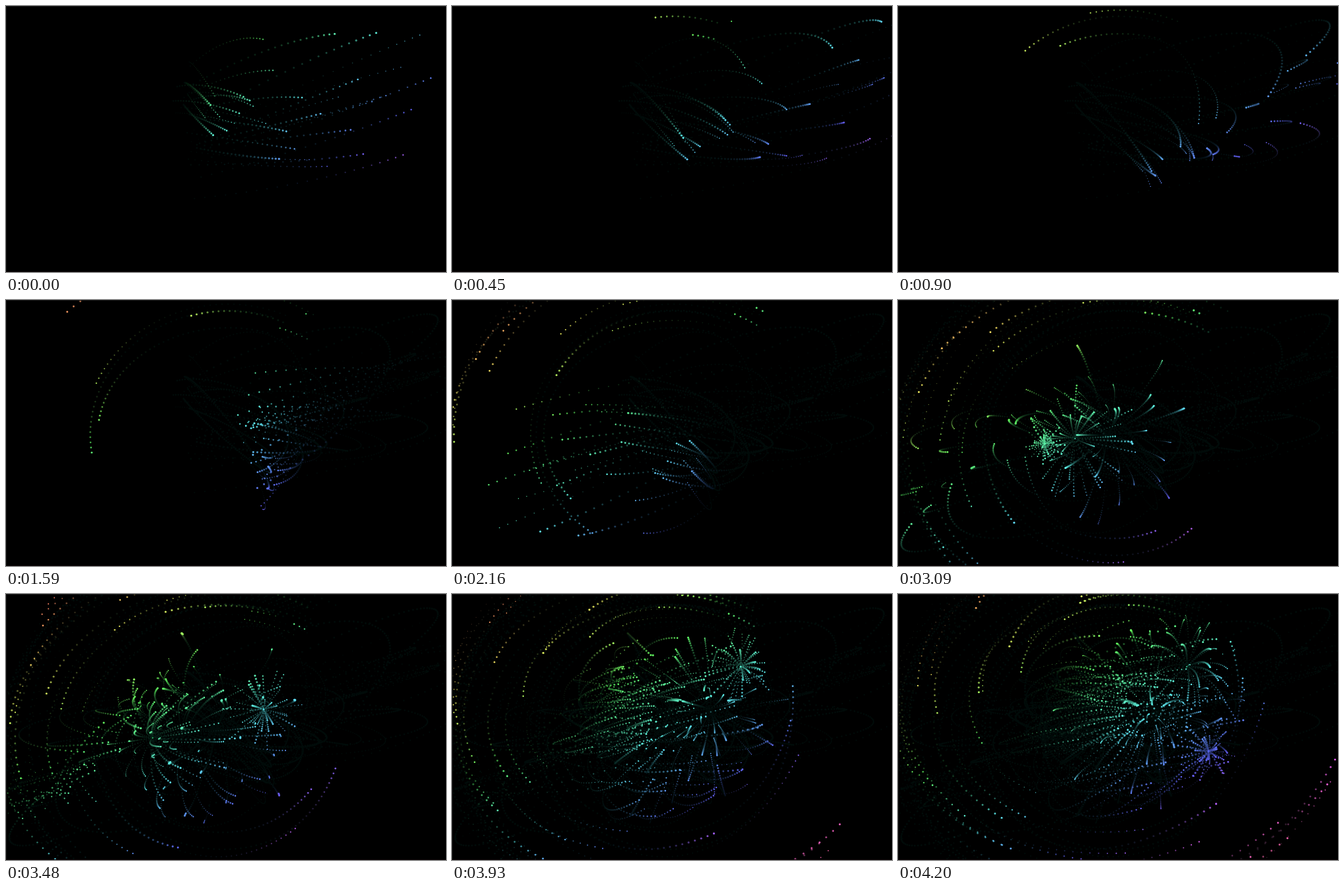
Write an HTML page with a canvas that moves like this. It is 666 px wide and 403 px high and loops after 4230 ms.

```html
<!DOCTYPE html>
<html lang="en">
<head>
<meta charset="utf-8">
<title>Orbiting sparks</title>
<style>
html, body { margin: 0; width: 100%; height: 100%; overflow: hidden; background: #000; }
canvas { display: block; width: 666px; height: 403px; }
</style>
</head>
<body>
<canvas id="stage" width="666" height="403"></canvas>
<script>
const W = 666, H = 403, STEP = 30, STEPS = 141, FIRST = -22;
const CX = 333, CY = 201, OMEGA = 0.042, PULL = OMEGA * OMEGA;
const FADE = 0.83, TAIL = 20;

const ctx = document.getElementById('stage').getContext('2d');
const ghost = document.createElement('canvas');
ghost.width = W;
ghost.height = H;
const gctx = ghost.getContext('2d');

let seed = 4711;
function rand() {
  seed = (seed * 1664525 + 1013904223) >>> 0;
  return seed / 4294967296;
}
const between = (a, b) => a + (b - a) * rand();
const mix = (a, b, k) => a + (b - a) * k;

// The emitter wanders and lets off a burst at each stop.
const stops = [
  { t: 74, x: 318, y: 205 },
  { t: 87, x: 268, y: 210 },
  { t: 98, x: 222, y: 218 },
  { t: 106, x: 390, y: 175 },
  { t: 122, x: 437, y: 110 },
  { t: 132, x: 470, y: 238 }
];

function emitter(t) {
  let from = { t: FIRST, x: CX, y: CY };
  for (const to of stops) {
    if (t < to.t) {
      const k = Math.max(0, 1 - (to.t - t) / Math.min(10, to.t - from.t));
      return [mix(from.x, to.x, k), mix(from.y, to.y, k)];
    }
    from = to;
  }
  return [from.x, from.y];
}

// Sparks are pulled like springs to a point halfway to the emitter.
const pulls = [];
for (let t = FIRST; t < STEPS; t++) {
  const [x, y] = emitter(t);
  pulls.push([mix(CX, x, 0.5), mix(CY, y, 0.5)]);
}

const sparks = [];
function launch(born, x, y, vx, vy) {
  const path = [];
  for (let t = born; t < STEPS; t++) {
    path.push([x, y]);
    const [ax, ay] = pulls[t - FIRST];
    vx += (ax - x) * PULL;
    vy += (ay - y) * PULL;
    x += vx;
    y += vy;
  }
  sparks.push({ born, path, r: between(0.65, 1.6) });
}

// A swarm already sweeping to the right when the loop begins.
function swarm(count) {
  const c = Math.cos(OMEGA * FIRST), s = Math.sin(OMEGA * FIRST);
  for (let i = 0; i < count; i++) {
    const x = 300 + 350 * Math.pow((i + rand()) / count, 1.3);
    const spread = 150 * Math.min(1, (x - 260) / 140);
    const y = 150 - 0.1 * (x - 450) + spread * (rand() + rand() - 1);
    const vx = 0.025 * (x - 190) + between(-0.8, 0.8);
    const vy = 3.5 - 0.025 * (x - 300) + between(-1.2, 1.2);
    const dx = x - CX, dy = y - CY;
    launch(FIRST,
      CX + dx * c + vx / OMEGA * s, CY + dy * c + vy / OMEGA * s,
      vx * c - dx * OMEGA * s, vy * c - dy * OMEGA * s);
  }
}

// Wide anticlockwise orbits that enter at the top one after another.
function ring(count) {
  for (let i = 0; i < count; i++) {
    const born = Math.round(4 + 124 * Math.pow(i / count, 0.75));
    const phi = between(0.95, 1.25), rx = between(185, 345), ry = rx * between(0.78, 0.95);
    launch(born,
      CX + rx * Math.cos(phi), CY - ry * Math.sin(phi),
      -rx * OMEGA * Math.sin(phi), -ry * OMEGA * Math.cos(phi));
  }
}

function burst({ t, x, y }, count) {
  for (let i = 0; i < count; i++) {
    const angle = Math.PI * 2 * (i + rand()) / count, v = between(1.6, 6.6);
    launch(t, x, y, Math.cos(angle) * v, Math.sin(angle) * v);
  }
}

swarm(34);
ring(48);
for (const stop of stops) burst(stop, 34);

function eachDot(t, paint) {
  for (const s of sparks) {
    if (t < s.born) continue;
    const [x, y] = s.path[t - s.born];
    if (x > -3 && x < W + 3 && y > -3 && y < H + 3) paint(x, y, s.r);
  }
}

// Faint marks that stay along every path until the loop restarts.
let done = FIRST - 1;
function growGhost(step) {
  if (step < done) {
    gctx.clearRect(0, 0, W, H);
    done = FIRST - 1;
  }
  gctx.fillStyle = '#010b09';
  while (done < step) {
    done++;
    gctx.beginPath();
    eachDot(done, (x, y, r) => {
      gctx.moveTo(x + r, y);
      gctx.arc(x, y, r, 0, Math.PI * 2);
    });
    gctx.fill();
  }
}

function draw(step) {
  growGhost(step);
  ctx.globalAlpha = 1;
  ctx.fillStyle = '#000';
  ctx.fillRect(0, 0, W, H);
  ctx.drawImage(ghost, 0, 0);

  for (let age = TAIL; age >= 0; age--) {
    ctx.globalAlpha = Math.pow(FADE, age);
    eachDot(step - age, (x, y, r) => {
      const hue = Math.round(0.3 * x + 0.45 * y - 14);
      ctx.fillStyle = `hsl(${hue}, 85%, 66%)`;
      ctx.beginPath();
      ctx.arc(x, y, r, 0, Math.PI * 2);
      ctx.fill();
    });
  }

  ctx.globalAlpha = 1;
  ctx.fillStyle = '#1a1a1a';
  ctx.fillRect(0, 0, W, 1);
  ctx.fillStyle = '#111';
  ctx.fillRect(0, 0, 1, H);
  ctx.fillStyle = '#0e0608';
  ctx.fillRect(0, H - 1, W, 1);
}

let shown = -1;
function tick() {
  const step = Math.floor(performance.now() / STEP) % STEPS;
  if (step !== shown) draw(shown = step);
  requestAnimationFrame(tick);
}
tick();
</script>
</body>
</html>
```
